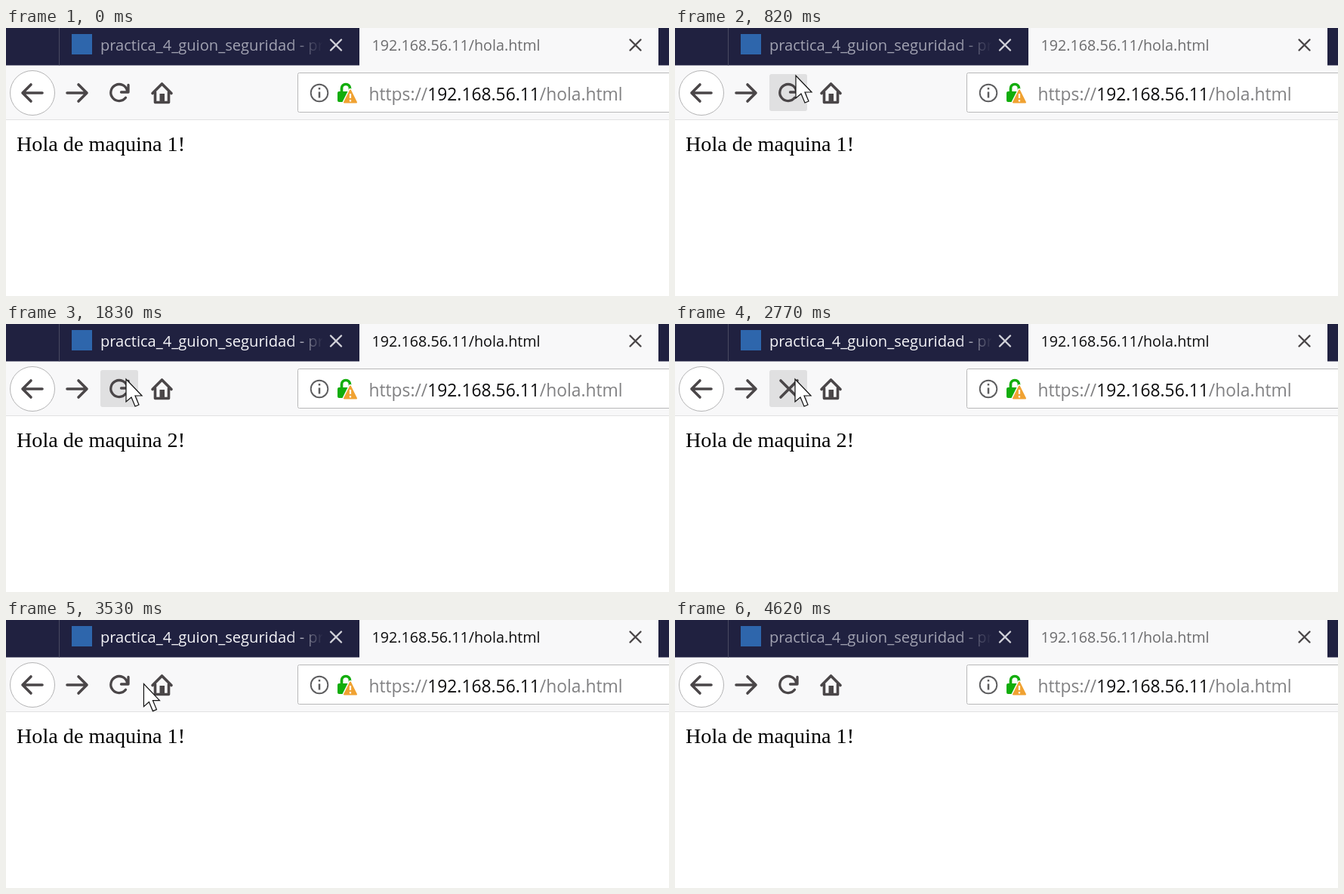
An HTML page for the animation above (4700 ms loop, 878 by 355 pixels).

```html
<!DOCTYPE html>
<html lang="es">
<head>
<meta charset="utf-8">
<title>Hola</title>
<style>
  html, body { margin: 0; width: 100%; height: 100%; overflow: hidden; background: #fff; }
  svg { display: block; width: 878px; height: 355px; }
  text { font-family: "Open Sans", "Noto Sans", sans-serif; white-space: pre; }
  .line { fill: none; stroke: #4a4648; stroke-width: 3.6; stroke-linecap: round; stroke-linejoin: round; }
</style>
</head>
<body>
<svg viewBox="0 0 878 355">
  <defs>
    <linearGradient id="fade">
      <stop offset="0" stop-color="#202140" stop-opacity="0"/>
      <stop offset="1" stop-color="#202140"/>
    </linearGradient>
    <clipPath id="tabClip"><rect x="468" width="396" height="50"/></clipPath>
    <clipPath id="titleClip"><rect x="120" width="299" height="50"/></clipPath>
  </defs>

  <!-- tab bar -->
  <rect width="878" height="49.5" fill="#202140"/>
  <path d="M70.5 0V49.5" stroke="#484961"/>
  <rect x="87" y="8" width="27" height="27" fill="#2e66ac"/>
  <text id="otherTitle" x="125" y="30" font-size="20.1" clip-path="url(#titleClip)">practica_4_guion_seguridad - practica</text>
  <rect x="374" y="4" width="46" height="42" fill="url(#fade)"/>
  <path class="line" d="M430 15.5l14 14m0-14l-14 14" style="stroke:#d2d2da;stroke-width:2.4"/>
  <rect x="468" width="396" height="50" fill="#f8f8f9"/>
  <g clip-path="url(#tabClip)"><circle id="burst" cx="498" cy="22" fill="#0a84ff"/></g>
  <circle id="throbber" cy="22" r="5" fill="#0a84ff"/>
  <text id="title" y="30" font-size="19.7">192.168.56.11/hola.html</text>
  <path class="line" d="M826.5 15.5l14 14m0-14l-14 14" style="stroke-width:2.4"/>

  <!-- toolbar -->
  <rect y="50" width="878" height="71" fill="#f8f8f9"/>
  <path d="M0 121.5H878" stroke="#e1e1e2"/>
  <rect id="hover" x="125" y="61" width="50" height="49" rx="3" fill="#e0e0e1"/>
  <circle cx="35" cy="86" r="29.5" fill="#fff" stroke="#b4b4b5"/>
  <path class="line" d="M48 86H22.5M33 75L22 86l11 11"/>
  <path class="line" d="M81 86h25.5M96 75l11 11-11 11"/>
  <path id="reload" class="line" d="M160.5 83A11 11 0 1 0 158.5 92.3M162 75.500v9.500h-9.500" style="stroke-width:3.3"/>
  <path id="stop" class="line" d="M140 75l22 22m0-22l-22 22"/>
  <path class="line" d="M194 86.5L206.5 74l12.5 12.5M197.5 85v13.5h18V85"/>
  <rect x="203.5" y="87" width="6.5" height="10" fill="#4a4648"/>

  <!-- address field -->
  <rect x="386.5" y="59.5" width="500" height="52" rx="2" fill="#fff" stroke="#b8b8b9"/>
  <circle cx="415" cy="86" r="11.3" fill="none" stroke="#5c5c5e" stroke-width="1.9"/>
  <path d="M415 84.5v8M415 79v2.6" stroke="#5c5c5e" stroke-width="2.5"/>
  <path d="M444.500 86V80a5.500 5.500 0 0 1 11 0v4" fill="none" stroke="#12ad0b" stroke-width="3.7"/>
  <rect x="439" y="84" width="18" height="14" rx="2" fill="#12ad0b"/>
  <path d="M456 82.5l8 16h-16z" fill="#f0a232" stroke="#fff" stroke-width="5" stroke-linejoin="round"/>
  <path d="M456 82.5l8 16h-16z" fill="#f0a232" stroke="#f0a232" stroke-width="2" stroke-linejoin="round"/>
  <path d="M456 87v6M456 95v2.5" stroke="#fff" stroke-width="2.2"/>
  <text x="480.5" y="96" font-size="22.8" fill="#808082">https://<tspan fill="#0c0c0d">192.168.56.11</tspan>/hola.html</text>

  <!-- page -->
  <text id="page" x="14" y="163" font-size="28.2" style="font-family:'Liberation Serif',serif"></text>
  <path id="cursor" d="M0 0V30L7 24l5 12 5-2-5-12h9z" fill="#fff" stroke="#111" stroke-width="1.2"/>
</svg>
<script>
const LOOP = 4700, STEP = 230 / 3;
const el = Object.fromEntries([...document.querySelectorAll('svg [id]')].map(e => [e.id, e]));
const show = (e, on) => e.setAttribute('visibility', on ? 'visible' : 'hidden');
const set = (e, attrs) => { for (const k in attrs) e.setAttribute(k, attrs[k]); };
const mix = (a, b, p) => a.map((v, i) => v + (b[i] - v) * p);
const clamp = v => Math.min(1, Math.max(0, v));
const between = (t, a, b) => t >= a && t < b;
const sampled = (t, start) => STEP * Math.floor((t - start + 5) / STEP);

const entry = [571, 274], above = [160, 63], rest = [159, 73], exit = [686, 334];
const loads = [
  { click: 1050, start: 1220, painted: 1300, done: 1370, burst: 1373 },
  { click: 2770, start: 2920, painted: 3000, done: 3070, burst: 3084 }
];

function cursorAt(t) {
  if (t < 820) return mix(entry, above, 1 - (1 - clamp(sampled(t, 130) / 540)) ** 2);
  if (t < 3530) return mix(above, rest, clamp(sampled(t, 820) / (3 * STEP)));
  return mix(rest, exit, ((sampled(t, 3530) + STEP) / (7 * STEP)) ** 1.6);
}

// Progress along cubic-bezier(0, 0, 0, 1).
function burstEase(x) {
  const s = Math.cbrt(x);
  return 3 * s * s - 2 * s ** 3;
}

function draw(t) {
  const [x, y] = cursorAt(t);
  const pointing = between(t, 130, 4070);
  show(el.cursor, pointing);
  set(el.cursor, { transform: `translate(${x} ${y})` });
  show(el.hover, pointing && between(x, 125, 175) && between(y, 61, 110));

  const focused = between(t, 1220, 4620);
  set(el.otherTitle, { fill: focused ? '#f6f6f9' : '#a2a3b2' });
  set(el.title, { fill: focused ? '#0c0c0d' : '#6c6c6e' });

  const load = loads[t < loads[1].click ? 0 : 1];
  const busy = between(t, load.start, load.done);
  const stopping = between(t, load.click, load.start);
  show(el.stop, stopping);
  show(el.reload, !stopping);
  set(el.title, { x: busy ? 518.5 : 484.5 });
  show(el.throbber, busy);
  set(el.throbber, { cx: 498 - 7 * Math.cos(sampled(t, load.start) / 150) });

  const age = (load.start + sampled(t, load.start) - load.burst) / 375;
  const p = burstEase(clamp(age));
  show(el.burst, t >= load.done && age < 1);
  set(el.burst, { r: 10 * (1 + 39 * p), opacity: 0.4 * (1 - p) });

  el.page.textContent = `Hola de maquina ${between(t, loads[0].painted, loads[1].painted) ? 2 : 1}!`;
}

const began = performance.now();
function tick() {
  draw((performance.now() - began) % LOOP);
  requestAnimationFrame(tick);
}
tick();
</script>
</body>
</html>
```
